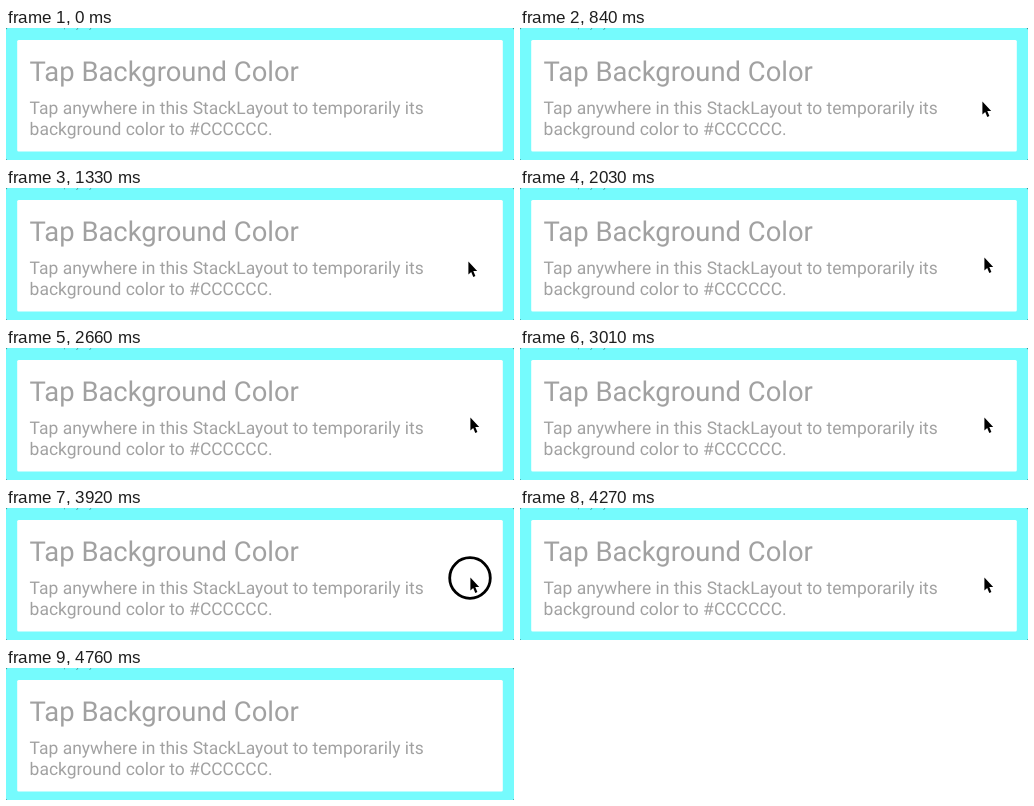
An HTML page for the animation above (4970 ms loop, 508 by 132 pixels).

```html
<!DOCTYPE html>
<html lang="en">
<head>
<meta charset="utf-8">
<title>Tap Background Color</title>
<style>
  html, body { margin: 0; width: 100%; height: 100%; overflow: hidden; background: #1d3f3f; }
  svg { display: block; width: 508px; height: 132px; }
  text {
    font-family: Roboto, sans-serif;
    font-size: 17.48px;
    fill: rgba(0, 0, 0, .37);
    text-rendering: geometricPrecision;
  }
  .title { font-size: 27.4px; }
</style>
</head>
<body>
<svg viewBox="0 0 508 132">
  <rect width="508" height="132" rx="1.5" fill="#75fbfd"/>
  <path d="M58 .5l1 .5M70.5 2l1.5-2M83.5 2l1.5-2" stroke="#397d7e" stroke-opacity=".7" fill="none"/>
  <rect id="card" x="11.2" y="12" width="485.6" height="111.5" rx="1.5" fill="#fff"/>
  <text class="title" x="23.5" y="53">Tap Background Color</text>
  <text x="23.6" y="86.3">Tap anywhere in this StackLayout to temporarily its</text>
  <text x="23.6" y="106.7">background color to #CCCCCC.</text>
  <g id="pointer">
    <circle id="ring" r="20.3" fill="none" stroke="#000" stroke-width="2.8"/>
    <path d="M.4 -.6V12.4L3.2 9.9 5.3 15 7.4 14.1 5.3 9.1H9.2Z" fill="#000" stroke="#fff" paint-order="stroke"/>
  </g>
</svg>
<script>
  const LOOP = 4970, TICK = 70, FADE = 210;
  // time, x, y, easing of the move that ends here
  const linear = u => u;
  const easeOut = u => 1 - (1 - u) ** 2;
  const path = [
    [350, 344, 122, linear],
    [840, 462, 74, easeOut],
    [1750, 462, 74, linear],
    [2030, 464, 70, linear],
    [4410, 464, 70, linear],
    [4550, 462, 52, linear],
    [4620, 462, 52, linear],
    [4690, 460, 8, linear]
  ];
  const presses = [[1120, 1330], [2590, 2660], [3920, 4060]];
  const flashes = [2800, 4060];

  const card = document.getElementById('card');
  const pointer = document.getElementById('pointer');
  const ring = document.getElementById('ring');
  const show = (el, on) => el.setAttribute('visibility', on ? 'visible' : 'hidden');

  function position(t) {
    const i = Math.max(1, path.findIndex(p => p[0] >= t));
    const [t0, x0, y0] = path[i - 1];
    const [t1, x1, y1, ease] = path[i];
    const k = ease((t - t0) / (t1 - t0));
    return [x0 + (x1 - x0) * k, y0 + (y1 - y0) * k];
  }

  function draw(now) {
    const t = Math.floor((now % LOOP) / TICK) * TICK;

    const inside = t >= path[0][0] && t <= path[path.length - 1][0];
    show(pointer, inside);
    if (inside) pointer.setAttribute('transform', `translate(${position(t)})`);
    show(ring, inside && presses.some(([a, b]) => t >= a && t < b));

    const start = flashes.find(f => t >= f && t < f + FADE);
    const shade = start === undefined ? 0 : 20 * (1 - (t - start) / FADE);
    const level = Math.round(255 - shade);
    card.setAttribute('fill', `rgb(${level},${level},${level})`);
  }

  const begin = performance.now();
  function frame() {
    draw(performance.now() - begin);
    requestAnimationFrame(frame);
  }
  frame();
</script>
</body>
</html>
```
